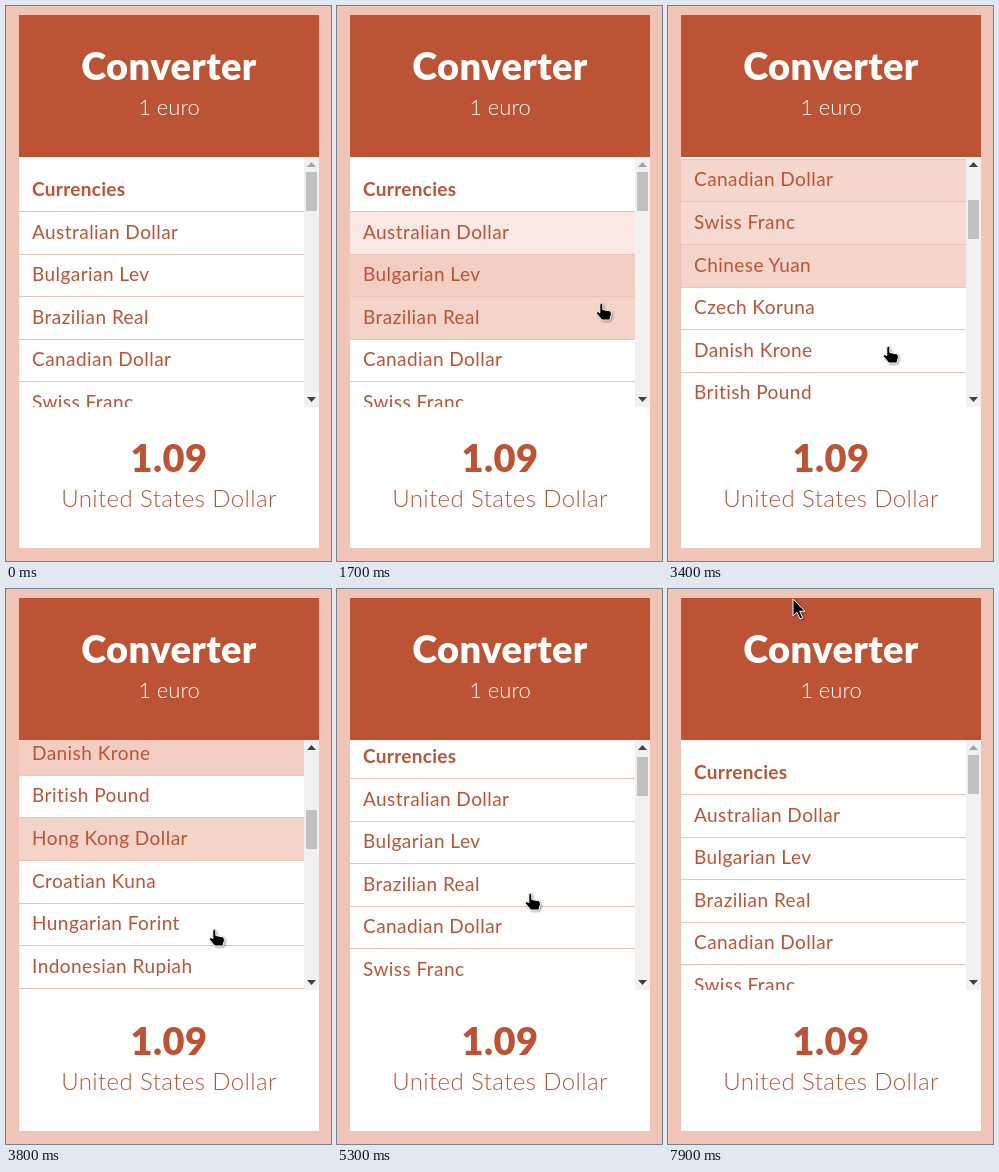
Animation, 325 px wide and 555 px high, one loop 8000 ms. Source, as an HTML page:

```html
<!DOCTYPE html>
<html lang="en">
<head>
<meta charset="utf-8">
<title>Converter</title>
<style>
  html, body { margin: 0; width: 100%; height: 100%; overflow: hidden; background: #f0c4b6; }
  svg { display: block; font-family: Lato, sans-serif; fill: #bc5334; }
  .mid { text-anchor: middle; }
  .big { font-size: 38px; font-weight: 900; letter-spacing: .4px; }
  .thin { font-size: 24px; font-weight: 300; letter-spacing: .4px; }
  .unit { font-size: 22px; letter-spacing: 0; }
  .white { fill: #fff; }
  .row { font-size: 19px; letter-spacing: .45px; }
  .head { font-size: 19px; font-weight: 700; letter-spacing: .3px; }
  .cursor { fill: #000; stroke: #fff; filter: drop-shadow(1px 1px 1px #0006); }
</style>
</head>
<body>
<svg width="325" height="555" viewBox="0 0 325 555">
  <clipPath id="view"><rect x="13" y="151" width="285" height="250"/></clipPath>
  <rect x="13" y="9" width="300" height="533" fill="#fff"/>
  <rect x="13" y="9" width="300" height="142"/>
  <text class="mid big white" x="163" y="74">Converter</text>
  <text class="mid thin unit white" x="163" y="108.5">1 euro</text>
  <g clip-path="url(#view)"><g id="list"></g></g>
  <rect x="298" y="151" width="15" height="250" fill="#f1f1f1"/>
  <path id="up" d="M301 161l4.5-5 4.5 5z"/>
  <path d="M301 391h9l-4.5 5z" fill="#404040"/>
  <rect id="thumb" x="300" y="166" width="11" height="39" fill="#c1c1c1"/>
  <text class="mid big" x="163" y="466">1.09</text>
  <text class="mid thin" x="163" y="500.5">United States Dollar</text>
  <path id="arrow" class="cursor" d="M0 0V17L4 13.3 7 20 9.7 18.8 6.8 12.3H12Z"/>
  <path id="hand" class="cursor" d="M-1.2 1.5Q.3-1 1.8 1.5V6.5L8.5 7.8Q10.8 8.6 10.4 11.5L8.8 17H.8L-4.6 10.4Q-4.4 7.6-1.2 9.6Z"/>
</svg>
<script>
const LOOP = 8000, STEP = 100, ENTER = 500;
const ROW = 42.6, TOP = 163.4, FADE_IN = 200, FADE_OUT = 1000;
const names = ['Currencies', 'Australian Dollar', 'Bulgarian Lev', 'Brazilian Real', 'Canadian Dollar',
  'Swiss Franc', 'Chinese Yuan', 'Czech Koruna', 'Danish Krone', 'British Pound', 'Hong Kong Dollar',
  'Croatian Kuna', 'Hungarian Forint', 'Indonesian Rupiah', 'Israeli Shekel', 'Indian Rupee'];

// Pointer stops: time, x, y
const stops = [[ENTER, 0, 96], [1300, 245, 250], [1600, 262, 293], [1700, 264, 297], [2400, 231, 339],
  [3000, 231, 339], [3800, 208, 340], [4700, 200, 331], [5600, 190, 290], [6100, 181, 217],
  [7200, 179, 165], [7500, 167, 86], [7900, 125, 10]];

const el = id => document.getElementById(id);
const clamp = u => Math.max(0, Math.min(1, u));

function add(tag, attrs) {
  const node = document.createElementNS('http://www.w3.org/2000/svg', tag);
  for (const key in attrs) node.setAttribute(key, attrs[key]);
  return el('list').appendChild(node);
}

const fills = names.map((name, i) => {
  const top = Math.round(TOP + i * ROW), bottom = Math.round(TOP + (i + 1) * ROW);
  add('rect', { x: 13, y: bottom - 1, width: 285, height: 1, fill: '#e9c4b7' });
  const fill = add('rect', { x: 13, y: top, width: 285, height: bottom - top, fill: '#f0c4b6' });
  add('text', { x: 26, y: TOP + i * ROW + 26.5, class: i ? 'row' : 'head' }).textContent = name;
  return fill;
});

function pointer(t) {
  const i = Math.max(1, stops.findIndex(stop => stop[0] >= t));
  const [t0, x0, y0] = stops[i - 1], [t1, x1, y1] = stops[i];
  const u = clamp((t - t0) / (t1 - t0));
  return [x0 + (x1 - x0) * u, y0 + (y1 - y0) * u];
}

// Wheel notches of 90px on the way down, one accelerating sweep back up.
function scrollAt(t) {
  const notches = Math.max(0, (t - 2880) / 230), whole = Math.floor(notches);
  const down = Math.min(395, 90 * (whole + (notches - whole) ** 4));
  return down * (1 - clamp((t - 4320) / 1000) ** 2);
}

function ease(t) {
  const u = clamp(t) ** .6;
  return u * u * (3 - 2 * u);
}

// The hovered row lags one step behind the scrolling.
function hovered(t) {
  const [x, y] = pointer(t);
  if (t < ENTER || x < 13 || y < 151) return 0;
  return Math.max(0, Math.floor((y - TOP + scrollAt(t - STEP)) / ROW));
}

const level = (row, t) =>
  row.from + (row.to - row.from) * ease((t - row.start) / (row.to ? FADE_IN : FADE_OUT));

function highlights(time) {
  const rows = names.map(() => ({ from: 0, to: 0, start: 0 }));
  for (let t = 0; t <= time; t += STEP) {
    const over = hovered(t);
    rows.forEach((row, i) => {
      const to = i && i === over ? 1 : 0;
      if (to !== row.to) Object.assign(row, { from: level(row, t), to, start: t });
    });
  }
  return rows.map(row => level(row, time));
}

function draw(t) {
  const scroll = Math.round(scrollAt(t));
  const [x, y] = pointer(t).map(Math.round);
  el('list').setAttribute('transform', `translate(0 ${-scroll})`);
  el('thumb').setAttribute('y', 166 + Math.round(scroll / 6.5));
  el('up').setAttribute('fill', scroll ? '#404040' : '#a3a3a3');
  highlights(t).forEach((v, i) => fills[i].setAttribute('opacity', v));
  const shown = t < ENTER ? '' : hovered(t) ? 'hand' : 'arrow';
  for (const id of ['arrow', 'hand']) {
    el(id).setAttribute('transform', `translate(${x} ${y})`);
    el(id).setAttribute('visibility', id === shown ? 'visible' : 'hidden');
  }
}

let last = -1;
function tick() {
  const t = Math.floor(performance.now() % LOOP / STEP) * STEP;
  if (t !== last) draw(last = t);
  requestAnimationFrame(tick);
}
tick();
</script>
</body>
</html>
```
